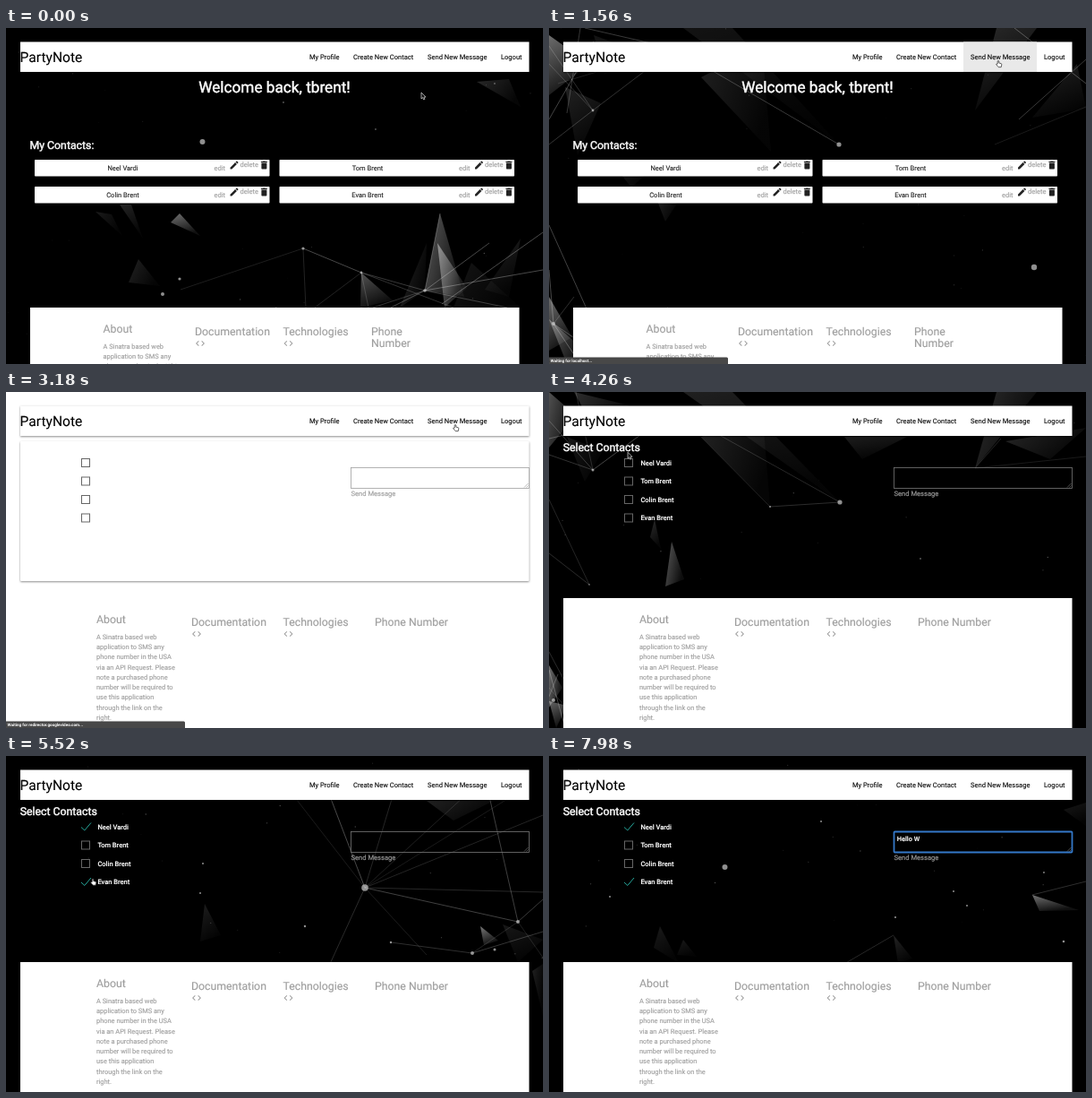
An HTML page for the animation above (8 s loop, 600 by 375 pixels).

```html
<!DOCTYPE html>
<html lang="en">
<head>
<meta charset="utf-8">
<title>Contact messenger</title>
<style>
html, body { margin: 0; width: 100%; height: 100%; overflow: hidden; background: #000; }
svg { display: block; width: 100vw; height: 100vh; font-family: Roboto, sans-serif; }
text { white-space: pre; text-rendering: geometricPrecision; stroke: #000; stroke-width: .1; }
.card { fill: #fff; filter: drop-shadow(0 1px .8px rgba(0,0,0,.45)); }
.grey { fill: #9e9e9e; stroke: #9e9e9e; stroke-width: .15; }
.white { fill: #fff; stroke: #fff; stroke-width: .45; }
.label { fill: #fff; stroke: #fff; stroke-width: .15; font-weight: 500; }
.box { fill: none; stroke: #666; }
.tick { fill: none; stroke: #26a69a; }
</style>
</head>
<body>
<svg id="stage" viewBox="0 0 600 375"></svg>
<script>
const LOOP = 8000, BLANK = 3175, READY = 3540;
const brand = 'PartyNote', user = 'tbrent';
const people = ['Neel Vardi', 'Tom Brent', 'Colin Brent', 'Evan Brent'];
const boxY = [79, 99.5, 120, 140.5];
const checkAt = [4620, null, null, 5400];
const message = 'Hello W';
const keyAt = [6400, 6600, 6780, 6960, 7130, 7290, 7450];
const focusAt = 6240;

const stage = document.getElementById('stage');
const $ = id => document.getElementById(id);
const clamp = x => Math.min(1, Math.max(0, x));
const smooth = (a, b, x) => { const u = clamp((x - a) / (b - a)); return u * u * (3 - 2 * u); };

function random(seed) {
  return () => (seed = (seed * 16807) % 2147483647) / 2147483647;
}

// Views of the drifting mesh: faint facets, bright facets, threads, nodes and drift in px per ms
const views = {
  harbour: {
    drift: [-.026, -.004],
    faces: 'M127 197 140 197 153 235Z M148 258 137 284 172 288Z M526 60 562 57 575 88Z M575 235 535 292 562 300Z M520 262 500 312 575 312Z M100 205 130 232 118 208Z M470 240 440 312 468 293Z',
    bright: 'M194 207 184 217 217 232Z M397 273 396 312 432 304Z M485 207 468 293 512 300Z M482 240 490 312 515 290Z',
    lines: 'M332 246 195 292 M332 246 335 312 M332 246 397 273 M397 273 345 312 M397 273 405 312 M397 273 468 293 M397 273 500 312 M468 293 430 312 M468 293 485 207 M468 293 540 240 M468 293 560 312 M468 293 410 312 M468 293 600 270 M487 308 600 228',
    dots: [[219.5, 127, 3], [175, 297, 2], [194, 280, 1.6], [332, 246, 1.6], [397, 273, 1.4], [468, 293, 1.8], [413, 113, .8], [310, 83, .8], [546, 62, .8]]
  },
  corner: {
    drift: [.004, -.012],
    faces: 'M18 66 58 84 32 142Z M50 8 98 26 62 52Z M70 150 112 160 92 178Z M115 178 130 216 143 196Z M150 0 205 0 324 130Z M170 55 238 20 248 138Z M500 0 545 0 476 92Z M590 40 600 90 540 100Z',
    bright: 'M0 8 45 40 0 75Z M0 300 26 345 0 360Z M0 325 20 375 42 362Z',
    lines: 'M40 0 140 23 M50 15 0 102 M140 23 10 62 M140 23 324 130 M0 40 49 92 M35 0 20 95 M49 92 140 23 M49 92 0 20 M0 130 49 92 M5 330 70 375 M5 330 0 270 M5 330 28 300 M5 330 35 375 M0 220 45 320 M600 35 525 102 M498 130 600 88 M520 0 600 62',
    dots: [[324, 130, 2.6], [542, 267, 3.2], [140, 23, 1.5], [5, 330, 2], [49, 92, 1.4]]
  },
  shore: {
    drift: [.006, -.01],
    faces: 'M150 0 205 0 325 123Z M170 50 238 18 247 128Z M118 142 125 175 113 162Z M20 50 60 66 40 100Z M500 0 545 0 476 85Z M510 55 600 40 560 75Z M28 0 90 15 50 40Z M330 50 400 50 350 75Z',
    bright: 'M137 167 151 209 130 217Z M0 0 30 26 0 62Z M0 305 15 330 0 352Z M0 345 20 350 8 375Z',
    lines: 'M140 20 325 123 M140 20 247 128 M247 128 325 123 M0 32 49 87 M0 70 49 87 M49 87 140 20 M30 0 49 87 M0 52 140 20 M0 120 45 215 M45 215 0 180 M0 310 18 375 M10 315 0 340 M0 330 24 358 M0 290 16 320 M476 85 600 72 M505 52 476 85',
    dots: [[325, 123, 2.6], [247, 128, 1], [45, 215, .8], [49, 87, 1.5], [5, 344, 2], [415, 186, .8]]
  },
  star: {
    drift: [-.018, .014],
    faces: 'M222 165 240 200 217 207Z M555 188 600 205 572 230Z M588 240 600 232 600 290Z M470 50 545 50 500 72Z',
    bright: 'M530 190 550 206 534 211Z',
    lines: 'M401 147 318 40 M401 147 362 45 M401 147 432 45 M401 147 512 45 M401 147 565 45 M401 147 600 66 M401 147 600 152 M401 147 572 185 M401 147 470 222 M401 147 362 232 M572 185 600 160 M572 185 521 220 M572 185 540 45 M572 185 600 225 M430 208 521 220 M521 220 600 196',
    dots: [[401, 147, 3.8], [572, 185, 2], [521, 220, 2], [546, 216, 1.5], [430, 208, 1.2], [334, 190, 1.2], [220, 120, 1], [217, 153, 1]]
  },
  gulf: {
    drift: [-.026, .02],
    faces: 'M150 212 186 208 160 229Z M30 185 62 182 20 216Z M430 185 442 216 400 230Z M525 140 552 182 530 212Z M490 181 550 186 512 210Z M552 182 586 212 560 228Z M8 0 40 0 24 14Z',
    bright: 'M75 163 60 196 86 206Z M190 206 186 212 166 230Z',
    lines: 'M312 189 283 52 M312 189 392 232 M430 185 600 228 M442 216 552 182 M490 181 586 212',
    dots: [[312, 189, 1.8], [552, 182, 1], [442, 216, .8], [160, 125, .9]]
  },
  calm: {
    drift: [-.026, -.003],
    faces: 'M124 190 117 214 145 231Z M150 205 143 222 165 224Z M385 200 390 231 406 226Z M575 60 600 52 600 78Z',
    bright: 'M540 155 548 173 592 172Z',
    lines: 'M385 200 330 232 M540 155 600 140',
    dots: [[196.5, 124, 3], [68, 157, 1], [304, 73, 1], [452, 151, 1], [467, 167, 1], [575, 207, 1.3], [553, 130, .9], [387, 180, 1.1]]
  }
};
const shots = [
  [[0, 'harbour'], [1560, 'corner'], [2820, 'star']],
  [[4260, 'shore'], [5520, 'star'], [6480, 'gulf'], [7980, 'calm']]
];

function drawView(name, i) {
  const rnd = random(917 + i * 7351);
  const { faces, bright, lines, dots } = views[name];
  const facets = (list, low, range) => list.split(/(?<=Z) /).map(d =>
    `<path d="${d}" fill="url(#sheen${rnd() < .5 ? 0 : 1})" opacity="${low + rnd() * range}"/>`).join('');
  let out = facets(faces, .1, .16) + facets(bright, .45, .25);
  for (const d of lines.split(/ (?=M)/))
    out += `<path d="${d}" stroke="#fff" stroke-width=".8" opacity="${.12 + rnd() * .24}"/>`;
  for (const [x, y, r] of dots)
    out += `<circle cx="${x}" cy="${y}" r="${r}" fill="#ccc" opacity=".7"/>`;
  for (let k = 0; k < 36; k++)
    out += `<circle cx="${rnd() * 620 - 10}" cy="${rnd() * 390 - 8}" r="${.3 + rnd() * .5}" fill="#fff" opacity="${.05 + rnd() * .25}"/>`;
  return `<g id="${name}">${out}</g>`;
}

const text = (x, y, size, str, attrs = '') => `<text x="${x}" y="${y}" font-size="${size}" ${attrs}>${str}</text>`;
const icon = (x, y, d, fill = '#222') => `<path transform="translate(${x} ${y}) scale(.5)" d="${d}" fill="${fill}"/>`;
const PEN = 'M3 17.25V21h3.75L17.81 9.94l-3.75-3.75L3 17.25zM20.71 7.04c.39-.39.39-1.02 0-1.41l-2.34-2.34c-.39-.39-1.02-.39-1.41 0l-1.83 1.83 3.75 3.75 1.83-1.83z';
const BIN = 'M6 19c0 1.1.9 2 2 2h8c1.1 0 2-.9 2-2V7H6v12zM19 4h-3.5l-1-1h-5l-1 1H5v2h14V4z';
const CODE = 'M9.4 16.6L4.8 12l4.6-4.6L8 6l-6 6 6 6 1.4-1.4zm5.2 0l4.6-4.6-4.6-4.6L16 6l6 6-6 6-1.4-1.4z';

const about = ['A Sinatra based web', 'application to SMS any', 'phone number in the USA',
  'via an API Request. Please', 'note a purchased phone', 'number will be required to',
  'use this application', 'through the link on the', 'right.'];

function footer(left, top, aboutX, docX, phoneX, phone) {
  const grey = 'class="grey"';
  return `<rect x="${left}" y="${top}" width="${600.5 - 2 * left}" height="${380 - top}" fill="#fff"/>`
    + text(aboutX, top + 27.6, 12.3, 'About', grey)
    + about.map((line, i) => text(aboutX, top + 45.8 + i * 11.25, 7.45, line, grey)).join('')
    + text(docX, top + 31.2, 12.3, 'Documentation', grey) + icon(docX, top + 34, CODE, '#9e9e9e')
    + text(309.5, top + 31.2, 12.3, 'Technologies', grey) + icon(309.5, top + 34, CODE, '#9e9e9e')
    + phone.map((line, i) => text(phoneX, top + 31.2 + i * 13, 12.3, line, grey)).join('');
}

function contact(name, i) {
  const x = i % 2 * 273.5, y = (i >> 1) * 30;
  return `<g transform="translate(${x} ${y})"><rect x="32" y="147" width="262.5" height="18.5" rx=".8" fill="#fff"/>`
    + text(130.5, 159.2, 7.5, name, 'text-anchor="middle" fill="#222"')
    + text(232.5, 159.2, 7.5, 'edit', 'class="grey"') + icon(249, 147, PEN)
    + text(261.5, 155.3, 7.5, 'delete', 'class="grey"') + icon(282.4, 147, BIN) + '</g>';
}

function option(name, i) {
  const y = boxY[i];
  return `<rect id="box${i}" class="box" x="84.5" y="${y - 4.5}" width="9" height="9"/>`
    + `<path id="tick${i}" class="tick" d="M84 ${y + .5} 87.8 ${y + 4} 95 ${y - 4.5}"/>`
    + text(102.4, y + 2.9, 7.5, name, 'class="label"');
}

const gradient = (i, x2, y2) => `<linearGradient id="sheen${i}" x2="${x2}" y2="${y2}">
  <stop stop-color="#fff" stop-opacity=".7"/><stop offset="1" stop-color="#fff" stop-opacity=".1"/></linearGradient>`;

stage.innerHTML = `<defs>${gradient(0, .4, 1)}${gradient(1, 1, .5)}</defs>
<rect width="600" height="375" fill="#000"/>
<g id="video">${Object.keys(views).map(drawView).join('')}</g>
<g id="blank"><rect width="600" height="375" fill="#fff"/>
  <rect class="card" x="16" y="55" width="568.5" height="156" rx="1"/></g>
<g id="home">
  ${text(300, 72.3, 17.2, `Welcome back, ${user}!`, 'class="white" text-anchor="middle"')}
  ${text(26.5, 135.3, 12.3, 'My Contacts:', 'class="white"')}
  ${people.map(contact).join('')}
  ${footer(27, 312, 108.5, 211, 408, ['Phone', 'Number'])}
</g>
<g id="compose">
  ${text(15.7, 66, 12.3, 'Select Contacts', 'class="white"')}
  ${people.map(option).join('')}
  <rect id="area" x="385.5" y="84.5" width="199" height="23" fill="none"/>
  <path d="M579 106.5 583.5 102M581.5 106.5 583.5 104.5" stroke="#888" stroke-width=".6"/>
  ${text(388.7, 94.6, 7.4, '', 'id="typed" class="label"')}
  <rect id="caret" y="88" width=".7" height="8" fill="#fff"/>
  ${text(385.5, 115.7, 7.6, 'Send Message', 'class="grey"')}
  ${footer(16, 230, 101, 207, 412, ['Phone Number'])}
</g>
<rect class="card" x="16" y="15.5" width="568.5" height="33.5"/>
<rect id="hover" x="463" y="15.5" width="82" height="33.5" fill="#e9e9e9"/>
${text(15.5, 38, 15.6, brand)}
${[[339, 'My Profile'], [388, 'Create New Contact'], [471, 'Send New Message'], [553, 'Logout']]
    .map(([x, s]) => text(x, 35, 7.55, s)).join('')}
<g id="status"><path d="M0 367.5H198.5q1.5 0 1.5 1.5V375H0Z" fill="#484848"/>
  ${text(1.5, 373, 4.6, '', 'id="waiting" fill="#fff" font-weight="600" style="stroke:none"')}</g>
<g id="pointer">
  <path id="arrow" d="M0 0V7L1.6 5.6 2.7 8 3.9 7.5 2.9 5.1H5Z" fill="#111" stroke="#ddd" stroke-width=".7"/>
  <path id="hand" d="M-.8.4Q0-.5.8.4V2.6L3.2 3.2Q4 3.5 3.8 4.5L3.2 7.2H.2L-2.3 4.2Q-2.4 3.1-.8 3.6Z" fill="#fff" stroke="#222" stroke-width=".7"/>
  <path id="beam" d="M-1.5-4Q0-4 0-3V3Q0 4-1.5 4M1.5-4Q0-4 0-3M0 3Q0 4 1.5 4" fill="none" stroke="#ccc" stroke-width=".6"/>
</g>`;

const show = (id, on) => $(id).setAttribute('display', on ? 'inline' : 'none');

const track = [[0, 464, 72], [350, 464, 72], [1200, 502, 36.5], [3560, 502, 36.5], [4240, 88, 67],
  [4480, 88, 77], [4720, 88, 77], [5280, 97, 137], [5620, 97, 137], [6160, 440, 96], [8000, 440, 96]];

function pointerAt(t) {
  const i = Math.max(1, track.findIndex(k => k[0] > t));
  const [a, x, y] = track[i - 1], [b, x2, y2] = track[i];
  const u = smooth(a, b, t);
  return [x + (x2 - x) * u, y + (y2 - y) * u];
}

function drawVideo(t) {
  for (const name in views) show(name, false);
  const list = shots[t < BLANK ? 0 : 1];
  list.forEach(([at, name], i) => {
    const mid = j => (list[j][0] + list[j + 1][0]) / 2;
    const fadeIn = i ? smooth(mid(i - 1) - 200, mid(i - 1) + 200, t) : 1;
    const fadeOut = i < list.length - 1 ? 1 - smooth(mid(i) - 200, mid(i) + 200, t) : 1;
    const alpha = fadeIn * fadeOut;
    if (!alpha) return;
    const [vx, vy] = views[name].drift, dt = t - at;
    show(name, true);
    $(name).setAttribute('opacity', alpha);
    $(name).setAttribute('transform', `translate(${vx * dt} ${vy * dt})`);
  });
}

function drawPointer(t) {
  const [x, y] = pointerAt(t);
  const overNav = y < 49 && x > 463;
  const overOption = t > READY && y > 73 && x < 145;
  const kind = overNav || overOption ? 'hand' : t > READY && x > 385 && y > 84 ? 'beam' : 'arrow';
  for (const id of ['arrow', 'hand', 'beam']) show(id, id === kind);
  show('pointer', t < 6350);
  $('pointer').setAttribute('transform', `translate(${x} ${y})`);
  show('hover', t < BLANK && overNav);
}

function drawForm(t) {
  checkAt.forEach((at, i) => {
    const on = at !== null && t >= at;
    show('box' + i, !on);
    show('tick' + i, on);
  });
  const focus = t >= focusAt, area = $('area');
  area.setAttribute('stroke', focus ? '#3478c8' : t < READY ? '#a0a0a0' : '#777');
  area.setAttribute('stroke-width', focus ? 1.8 : .8);
  area.setAttribute('rx', focus ? 1 : 0);
  const count = keyAt.filter(k => t >= k).length;
  $('typed').textContent = message.slice(0, count);
  const since = t - (count ? keyAt[count - 1] : focusAt);
  show('caret', focus && since % 1000 < 500);
  $('caret').setAttribute('x', 389 + (count ? $('typed').getComputedTextLength() : 0));
}

function draw(t) {
  const home = t < BLANK, blank = !home && t < READY;
  show('home', home);
  show('compose', !home);
  show('blank', blank);
  show('video', !blank);
  if (!blank) drawVideo(t);
  if (!home) drawForm(t);
  drawPointer(t);
  show('status', t >= 1430 && t < READY);
  $('waiting').textContent = home ? 'Waiting for localhost...' : 'Waiting for redirector.googlevideo.com...';
}

const start = performance.now();
function tick() {
  draw((performance.now() - start) % LOOP);
  requestAnimationFrame(tick);
}
tick();
</script>
</body>
</html>
```
